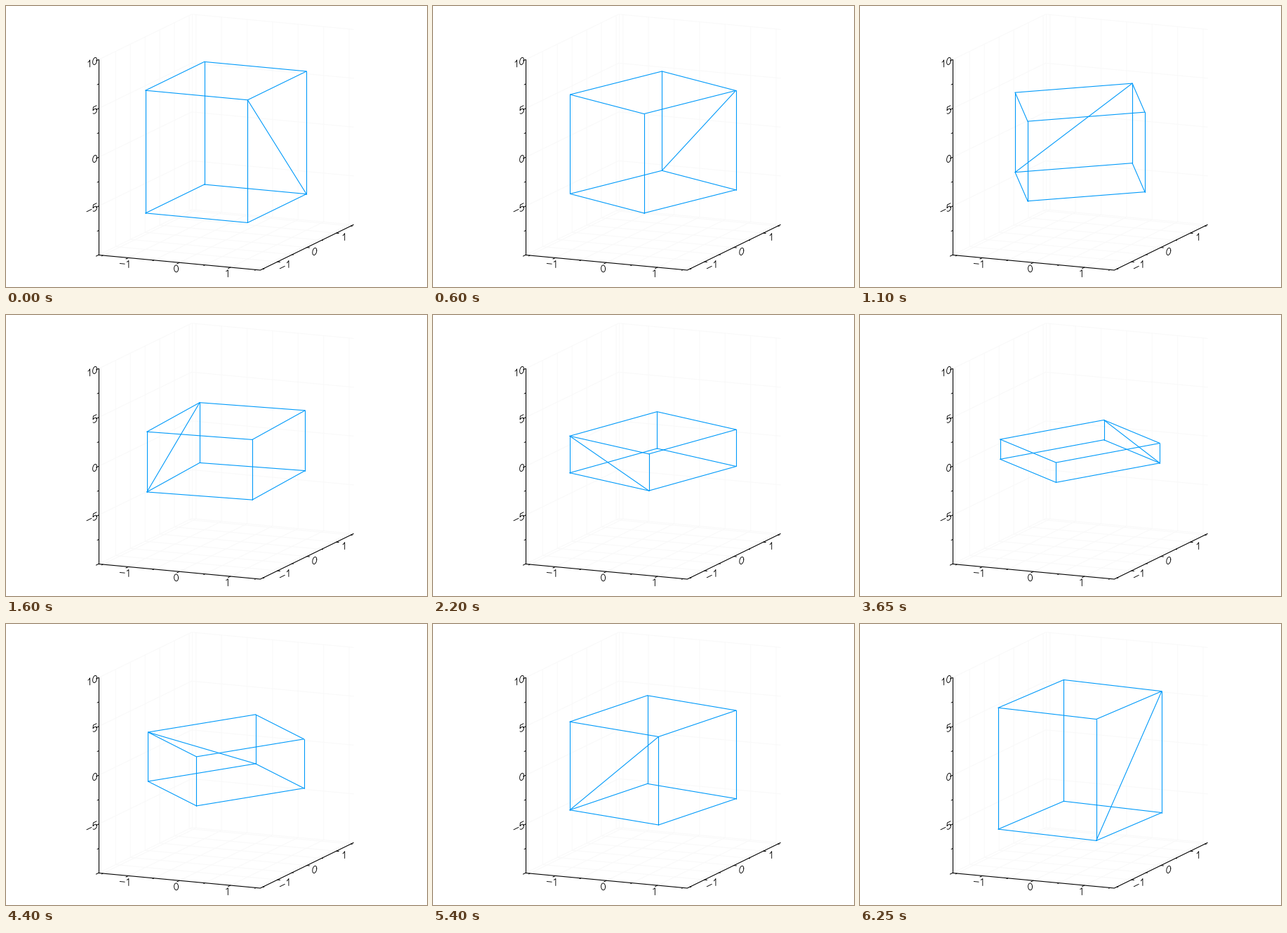
These frames come from a looping animation (600x400 px, 6300 ms). A matplotlib script:

```python
import numpy as np
import matplotlib.pyplot as plt
from matplotlib.animation import FuncAnimation
from matplotlib.collections import LineCollection

W, H, DPI = 600, 400, 100
FRAMES, STEP = 126, 50
PX = 72 / DPI

# Affine view: screen position of the centre and of one unit along each axis
CENTRE = np.array([313.5, 193.9])
VIEW = np.array([[72.75, 6.8], [41.9, -20.4], [0, -13.9]])
LIM, ZLIM = 1.585, 10
BLUE = "#009afa"


def project(points):
    return CENTRE + np.asarray(points, float) @ VIEW


fig = plt.figure(figsize=(W / DPI, H / DPI), dpi=DPI, facecolor="white")
ax = fig.add_axes([0, 0, 1, 1])
ax.set(xlim=(0, W), ylim=(H, 0))
ax.axis("off")


def strokes(lines, color, width=1.0):
    ax.add_collection(LineCollection(lines, colors=color, linewidths=width * PX,
                                     capstyle="round", joinstyle="round"))


# Faint grid on the floor and the two back walls
halves = np.arange(-1.5, 1.6, 0.5)
grid = []
for v in halves:
    grid.append(project([(v, -LIM, -ZLIM), (v, LIM, -ZLIM), (v, LIM, ZLIM)]))
    grid.append(project([(LIM, v, -ZLIM), (-LIM, v, -ZLIM), (-LIM, v, ZLIM)]))
for z in range(-10, 11, 5):
    grid.append(project([(-LIM, -LIM, z), (-LIM, LIM, z), (LIM, LIM, z)]))
grid.append(project([(-LIM, LIM, -ZLIM), (-LIM, LIM, ZLIM)]))
strokes(grid, "#f9f9f9")

# Axes and ticks
frame = [project([(-LIM, -LIM, ZLIM), (-LIM, -LIM, -ZLIM)]),
         project([(-LIM, -LIM, -ZLIM), (LIM, -LIM, -ZLIM), (LIM, LIM, -ZLIM)])]
strokes(frame, "black", 1.1)

ticks = []
for v in halves:
    size = 1.0 if v == int(v) else 0.5
    ticks.append(project([(v, -LIM, -ZLIM), (v, -LIM - 0.08 * size, -ZLIM)]))
    ticks.append(project([(LIM, v, -ZLIM), (LIM + 0.05 * size, v, -ZLIM)]))
for z in np.arange(-10, 10.1, 2.5):
    size = 1.0 if z % 5 == 0 else 0.5
    ticks.append(project([(-LIM, -LIM, z), (-LIM, -LIM - 0.08 * size, z)]))
strokes(ticks, "black")

# Single-stroke glyphs, centred on their cell, y up
turn = np.linspace(0, 2 * np.pi, 25)
bowl = np.radians(np.linspace(125, -145, 16))
GLYPHS = {
    "0": np.column_stack([3.0 * np.cos(turn), 4.9 * np.sin(turn)]),
    "1": np.array([(-1.6, 3.0), (-0.4, 3.6), (1.0, 5.0), (1.0, -5.0)]),
    "5": np.vstack([[(2.5, 5.0), (-2.2, 5.0), (-2.6, 0.7)],
                    np.column_stack([-0.1 + 3.0 * np.cos(bowl),
                                     -1.7 + 3.3 * np.sin(bowl)])]),
    "-": np.array([(-3.6, -0.2), (3.4, -0.2)]),
}
X_SLOPE = VIEW[0, 1] / VIEW[0, 0]
Y_SLOPE = VIEW[1, 1] / VIEW[1, 0]


def label(text, x, y, slope):
    lines = []
    for i, char in enumerate(text):
        gx, gy = GLYPHS[char].T
        gx = gx + 8 * (i - (len(text) - 1) / 2)
        lines.append(np.column_stack([x + gx, y - gy + slope * gx]))
    strokes(lines, "black", 0.9)


for v in (-1, 0, 1):
    text = str(v)
    x, y = project((v, -LIM, -ZLIM))
    label(text, x - 4.5, y + 8.6, X_SLOPE)
    x, y = project((LIM, v, -ZLIM))
    label(text, x + 11, y + 5.8, Y_SLOPE)
for z in (-5, 0, 5, 10):
    text = str(z)
    x, y = project((-LIM, -LIM, z))
    shift = 4 * (len(text) - 1)
    label(text, x - 5.2 - shift, y + 2 - Y_SLOPE * shift, Y_SLOPE)

# Cube: bottom and top rings, uprights and one face diagonal
ring = [(-1, -1), (1, -1), (1, 1), (-1, 1)]
corners = np.array([(x, y, z) for z in (-1, 1) for x, y in ring], float)
edges = [(i, (i + 1) % 4) for i in range(4)]
edges += [(i + 4, j + 4) for i, j in edges]
edges += [(i, i + 4) for i in range(4)]
edges.append((5, 2))

cube = LineCollection([], colors=BLUE, linewidths=1.1 * PX, capstyle="round")
ax.add_collection(cube)


def update(i):
    angle = 0.1 * i
    c, s = np.cos(angle), np.sin(angle)
    x, y, z = corners.T
    pts = project(np.column_stack([c * x - s * y, s * x + c * y,
                                   z * (2 * np.pi - angle)]))
    cube.set_segments([pts[list(e)] for e in edges])
    return [cube]


anim = FuncAnimation(fig, update, frames=FRAMES, interval=STEP,
                     repeat=True, repeat_delay=0, blit=False)
plt.show()
```
